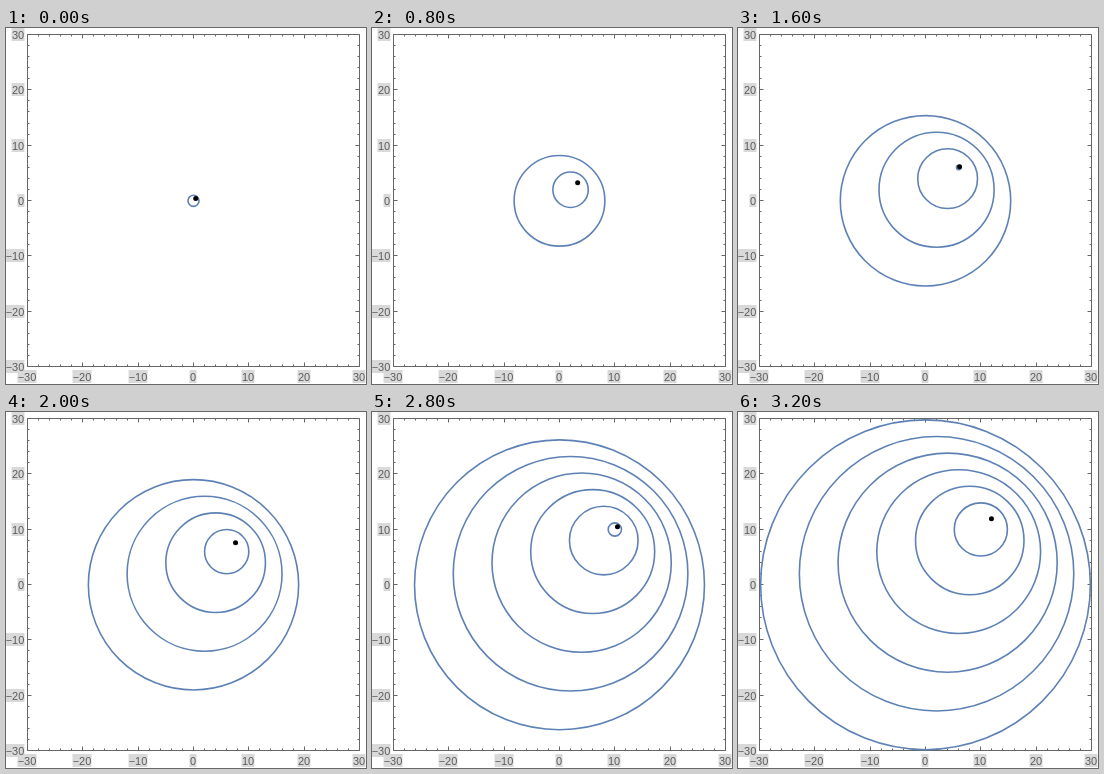
An HTML page for the animation above (3.3 s loop, 360x356 px).

```html
<!DOCTYPE html>
<html>
<head>
<meta charset="utf-8">
<title>Wavefronts of a moving emitter</title>
<style>
html, body { margin: 0; width: 100%; height: 100%; overflow: hidden; background: #fff; }
svg { display: block; }
text { font: 11px "Liberation Sans", Arial, sans-serif; fill: #5c5c5c; }
</style>
</head>
<body>
<svg id="stage" width="360" height="356" viewBox="0 0 360 356"></svg>
<script>
const stage = document.getElementById('stage');
const LEFT = 21.5, TOP = 6.5, SIZE = 332, SCALE = SIZE / 60;
const RIGHT = LEFT + SIZE, BOTTOM = TOP + SIZE;
const STEP = 100, LOOP = 3300;
const px = x => 187.5 + x * SCALE;
const py = y => 172.8 - y * SCALE;

function add(tag, attrs, text = '') {
  const el = document.createElementNS('http://www.w3.org/2000/svg', tag);
  for (const key in attrs) el.setAttribute(key, attrs[key]);
  el.textContent = text;
  stage.append(el);
  return el;
}

// A label on its grey box, centred on (x, y)
function label(text, x, y, width) {
  add('rect', { x: x - width / 2, y: y - 6.5, width, height: 13, fill: '#d9d9d9' });
  add('text', { x, y: y + 4, 'text-anchor': 'middle' }, text);
}

let axes = `M${LEFT} ${TOP}H${RIGHT}V${BOTTOM}H${LEFT}Z`;
for (let v = -30; v <= 30; v += 2) {
  const major = v % 10 === 0, len = major ? 4 : 2;
  const x = Math.floor(px(v)) + 0.5;
  const y = Math.floor(172.5 - v * SCALE) + 0.5;
  axes += `M${x} ${TOP}v${len}M${x} ${BOTTOM}v${-len}M${LEFT} ${y}h${len}M${RIGHT} ${y}h${-len}`;
  if (major) {
    const text = String(v).replace('-', '\u2212');
    const width = 6 * text.length + 1;
    label(text, x - 0.5, 348.5, width);
    label(text, 18.5 - width / 2, y, width);
  }
}
add('path', { d: axes, fill: 'none', stroke: '#666' });

const rings = Array.from({ length: 6 }, (_, k) => add('circle', {
  cx: px(2 * k), cy: py(2 * k), fill: 'none', stroke: '#5e81b5', 'stroke-width': 1.6
}));
const dot = add('circle', { r: 2.5 });

// The emitter moves 2 units along each axis while a wave spreads by 5
function draw(now) {
  const reach = 1 + 0.9 * Math.floor(now % LOOP / STEP);
  rings.forEach((ring, k) => {
    const r = reach - 5 * k;
    ring.setAttribute('r', Math.max(0, r * SCALE));
    ring.style.display = r > 0.01 ? '' : 'none';
  });
  dot.setAttribute('cx', px(0.4 * reach));
  dot.setAttribute('cy', py(0.4 * reach));
}

let start;
function tick(now) {
  start ??= now;
  draw(now - start);
  requestAnimationFrame(tick);
}
draw(0);
requestAnimationFrame(tick);
</script>
</body>
</html>
```
